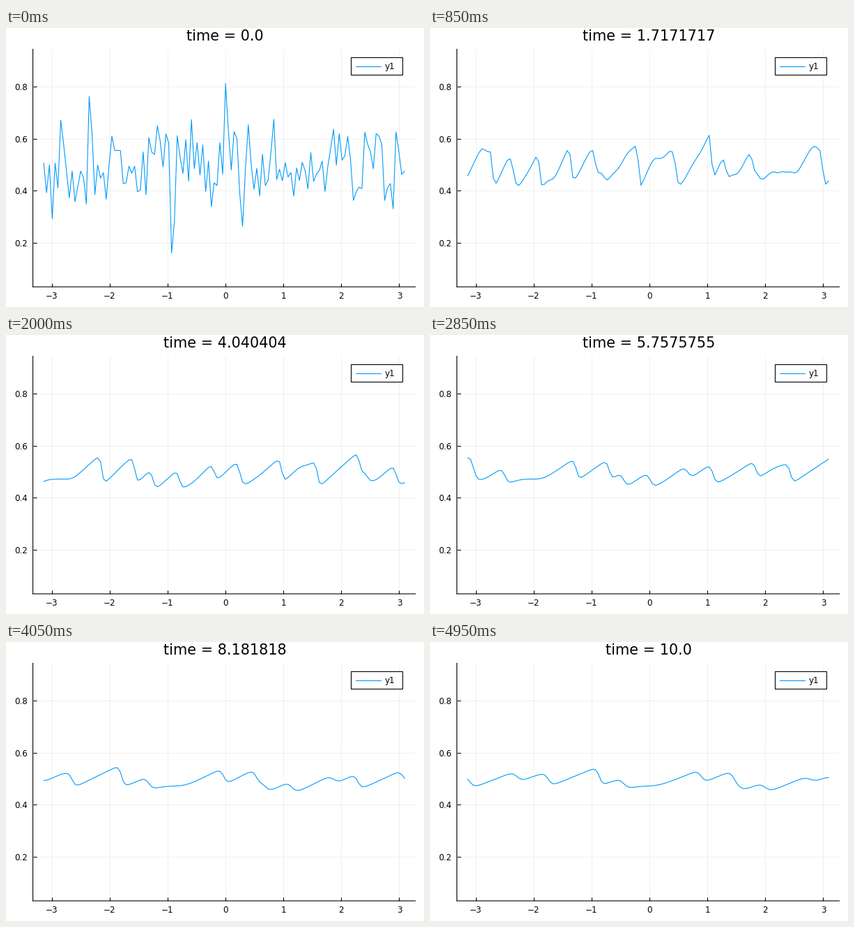
Write a matplotlib script that moves like this. It is 600 px wide and 400 px high and loops after 5000 ms.

```python
import numpy as np
import matplotlib.pyplot as plt
from matplotlib.animation import FuncAnimation
from matplotlib.lines import Line2D
from matplotlib.patches import Rectangle
from matplotlib.transforms import Affine2D

W, H, DPI = 600, 400, 100
PT = 72 / DPI  # points per pixel
FRAMES, INTERVAL = 100, 50
T_END = 10
N = 128
MEAN = 0.4935
NU = 0.001  # viscosity
BLUE = "#009afa"

plt.rcParams["font.family"] = "DejaVu Sans"

# Turning points (grid index, height) of the summed starting state
TURNS = [(1, 27), (5, -237), (7, 26), (15, -548), (17, -153), (22, -451),
         (27, -146), (36, -541), (44, 136), (45, -197), (46, -409), (56, 75),
         (61, -292), (63, -231), (64, 87), (68, 450), (70, 116), (73, 276),
         (79, -12), (81, 225), (99, -326), (108, 220), (112, -173),
         (119, 416), (123, -25), (125, 165)]


def starting_state():
    """Seeded noise whose running sum passes through the turning points."""
    index, height = np.array(TURNS).T
    noise = np.random.default_rng(4).uniform(-75, 75, N)
    noise[index] = 0
    total = np.interp(np.arange(N), index, height, period=N) + noise
    return MEAN + (total - np.roll(total, 1)) / 1000


x = -np.pi + 2 * np.pi * np.arange(N) / N
u0 = starting_state()

# Primitive of the fluctuation on a fine periodic grid
fine = np.linspace(-np.pi, np.pi, 32 * N + 1)
v = np.interp(fine, x, u0 - MEAN, period=2 * np.pi)
prim = np.concatenate([[0], np.cumsum((v[1:] + v[:-1]) / 2 * np.diff(fine))])
shift = np.linspace(-1.5, 1.5, 1201)


def burgers(t):
    """Periodic viscous Burgers solution by the Cole-Hopf formula."""
    if t == 0:
        return u0
    y = (x - MEAN * t)[:, None] + shift
    y = (y + np.pi) % (2 * np.pi) - np.pi
    phase = shift**2 / (2 * t) + np.interp(y, fine, prim)
    phase -= phase.min(axis=1, keepdims=True)
    w = np.exp(-phase / (2 * NU))
    return MEAN - (w @ shift) / (t * w.sum(axis=1))


fig = plt.figure(figsize=(W / DPI, H / DPI), dpi=DPI, facecolor="white")
pixel = Affine2D().scale(1 / W, -1 / H).translate(0, 1) + fig.transFigure

left, right, top, bottom = 38.6, 587.6, 30.4, 371.1
ax = fig.add_axes([left / W, 1 - bottom / H, (right - left) / W, (bottom - top) / H])
margin = 0.03 * (x[-1] - x[0])
ax.set_xlim(x[0] - margin, x[-1] + margin)
ax.set_ylim(0.0314, 0.9431)
ax.set_xticks(range(-3, 4))
ax.set_yticks([0.2, 0.4, 0.6, 0.8])
ax.spines[["top", "right"]].set_visible(False)
for side in ("left", "bottom"):
    ax.spines[side].set(linewidth=1.1 * PT, snap=False)
ax.tick_params(direction="in", length=5 * PT, width=1.1 * PT, labelsize=11.9 * PT)
ax.tick_params(axis="x", pad=6.4 * PT)
ax.tick_params(axis="y", pad=7.6 * PT)
ax.set_axisbelow(True)
ax.grid(color="black", alpha=0.055, linewidth=1 * PT)

curve, = ax.plot(x, u0, color=BLUE, linewidth=1.1 * PT)
title = fig.text(314.2, 18, "", transform=pixel, fontsize=20.8 * PT,
                 ha="center", va="baseline")

# Legend
fig.add_artist(Rectangle((495.2, 41.8), 74.1, 25.2, transform=pixel, facecolor="white",
                         edgecolor="black", linewidth=1.1 * PT))
fig.add_artist(Line2D([501.5, 538], [54.6, 54.6], transform=pixel, color=BLUE,
                      linewidth=1.1 * PT))
fig.text(543.7, 59.1, "y1", transform=pixel, fontsize=11.9 * PT, va="baseline")


def draw(i):
    t = np.float32(i / (FRAMES - 1)) * np.float32(T_END)
    curve.set_ydata(burgers(float(t)))
    title.set_text(f"time = {str(t)}")
    return curve, title


anim = FuncAnimation(fig, draw, frames=FRAMES, interval=INTERVAL, repeat=True)
plt.show()
```
